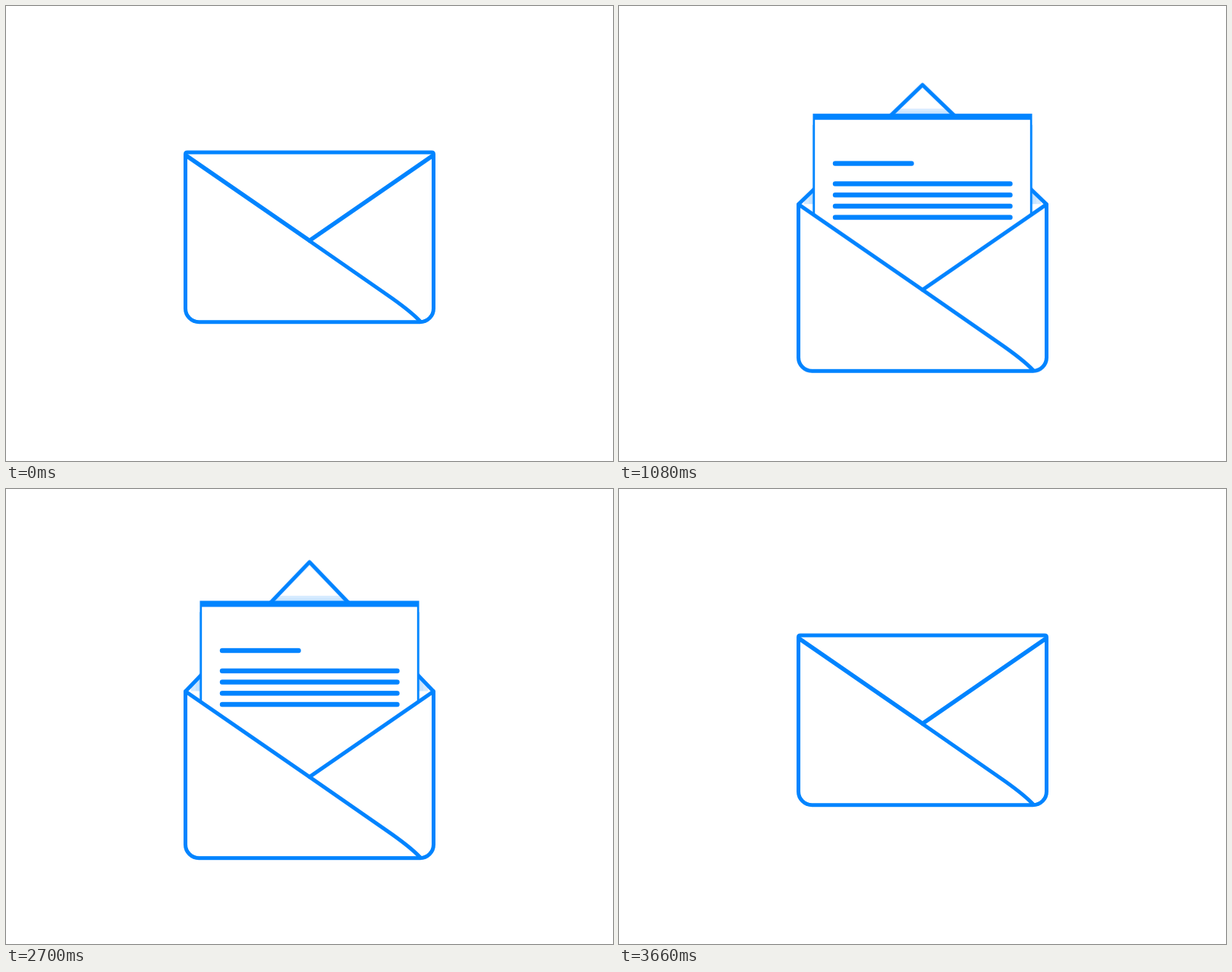
An HTML page with a canvas for the animation above (4140 ms loop, 800 by 600 pixels).

```html
<!DOCTYPE html>
<html lang="en">
<head>
<meta charset="utf-8">
<title>Envelope</title>
<style>
  html, body { margin: 0; width: 100%; height: 100%; overflow: hidden; background: #fff; }
  canvas { display: block; width: 800px; height: 600px; }
</style>
</head>
<body>
<canvas id="stage" width="800" height="600"></canvas>
<script>
const LOOP = 4140, STEP = 30, SHUTTER = 15, SAMPLES = 14;
const BLUE = '#0084ff';
const LEFT = 236.5, RIGHT = 563.5, MID = 400, HINGE = 196.5, BASE = 416.8;
const CLOSED = -112.5;

// [time, value] keys, eased in and out between neighbours
const bodyKeys = [[0, 0], [360, -11], [870, 72], [1230, 60], [2370, 60], [2820, 72], [3270, -11], [3660, 0]];
const flapKeys = [[417, -150], [840, 181], [1320, 133], [2400, 133], [2835, 181], [3258, -150]];
const letterKeys = [[600, 330], [1080, 81.5], [1440, 119.5], [2385, 119.5], [2700, 81.5], [3120, 330]];

const stage = document.getElementById('stage').getContext('2d');
const buffer = document.createElement('canvas');
buffer.width = 800;
buffer.height = 600;
const ctx = buffer.getContext('2d');

function track(keys, t) {
  if (t <= keys[0][0]) return keys[0][1];
  for (let i = 1; i < keys.length; i++) {
    const [t0, a] = keys[i - 1], [t1, b] = keys[i];
    if (t < t1) {
      const u = (t - t0) / (t1 - t0);
      return a + (b - a) * u * u * (3 - 2 * u);
    }
  }
  return keys[keys.length - 1][1];
}

const poseAt = t => ({
  body: track(bodyKeys, t),
  flap: Math.max(CLOSED, track(flapKeys, t)),
  letter: track(letterKeys, t)
});

function stroke(path, width) {
  ctx.lineWidth = width;
  ctx.stroke(path);
}

function bar(x0, x1, y) {
  stroke(new Path2D(`M${x0} ${y}H${x1}`), 6.4);
}

function drawFlap(height, letter) {
  const tip = HINGE - height;
  const edges = new Path2D(`M${LEFT + 0.5} ${HINGE}L${MID} ${tip}L${RIGHT - 0.5} ${HINGE}`);
  if (height > 0) {
    // soft shade the letter casts on the inside of the flap
    ctx.save();
    ctx.clip(edges);
    ctx.fillStyle = 'rgba(0, 132, 255, 0.16)';
    ctx.fillRect(244, letter - 10.5, 312, 400);
    ctx.fillStyle = 'rgba(0, 132, 255, 0.06)';
    ctx.fillRect(250, letter - 7, 300, 400);
    ctx.restore();
  }
  stroke(edges, 2.2 + 2.8 * Math.min(1, Math.abs(height) / 112));
  if (height < 0) {
    stroke(new Path2D(`M${LEFT} 197V195.5Q${LEFT} 193 239 193H561Q${RIGHT} 193 ${RIGHT} 195.5V197`), 5);
  }
}

function drawLetter(y) {
  ctx.save();
  ctx.beginPath();
  ctx.rect(0, -200, 800, 610);
  ctx.clip();
  ctx.fillStyle = 'rgba(0, 132, 255, 0.2)';
  ctx.fillRect(254.3, y + 11, 291.4, 400);
  ctx.fillStyle = BLUE;
  ctx.fillRect(255.5, y - 4, 289, 400);
  ctx.fillStyle = '#fff';
  ctx.fillRect(258.2, y + 4, 283.6, 400);
  bar(285, 385.5, y + 61.6);
  for (let i = 0; i < 4; i++) bar(285, 515.5, y + 88.4 + i * 14.75);
  ctx.restore();
}

function drawPocket() {
  const outline = new Path2D(`M${LEFT} 197L${MID} 309.8L${RIGHT} 197V399
    Q${RIGHT} 399 ${RIGHT} 399A18 17.8 0 0 1 545.5 ${BASE}H254.5A18 17.8 0 0 1 ${LEFT} 399Z`);
  ctx.fillStyle = '#fff';
  ctx.fill(outline);
  stroke(outline, 5);
  stroke(new Path2D(`M${MID} 309.8L500 379.3Q533 402 546 416`), 5);
}

function drawScene(pose) {
  ctx.setTransform(1, 0, 0, 1, 0, 0);
  ctx.fillStyle = '#fff';
  ctx.fillRect(0, 0, 800, 600);
  ctx.translate(0, pose.body);
  ctx.strokeStyle = BLUE;
  ctx.lineCap = ctx.lineJoin = 'round';
  drawFlap(pose.flap, pose.letter);
  drawLetter(pose.letter);
  drawPocket();
}

// Average several moments inside the shutter for motion blur
function render(t) {
  const start = poseAt(t - SHUTTER / 2), end = poseAt(t + SHUTTER / 2);
  const still = Object.keys(start).every(k => Math.abs(start[k] - end[k]) < 0.05);
  const count = still ? 1 : SAMPLES;
  for (let i = 0; i < count; i++) {
    drawScene(poseAt(still ? t : t + SHUTTER * ((i + 0.5) / count - 0.5)));
    stage.globalAlpha = 1 / (i + 1);
    stage.drawImage(buffer, 0, 0);
  }
}

let shown = -1;
const origin = performance.now();

function tick() {
  const t = Math.floor(((performance.now() - origin) % LOOP) / STEP) * STEP;
  if (t !== shown) {
    render(t);
    shown = t;
  }
  requestAnimationFrame(tick);
}
tick();
</script>
</body>
</html>
```
